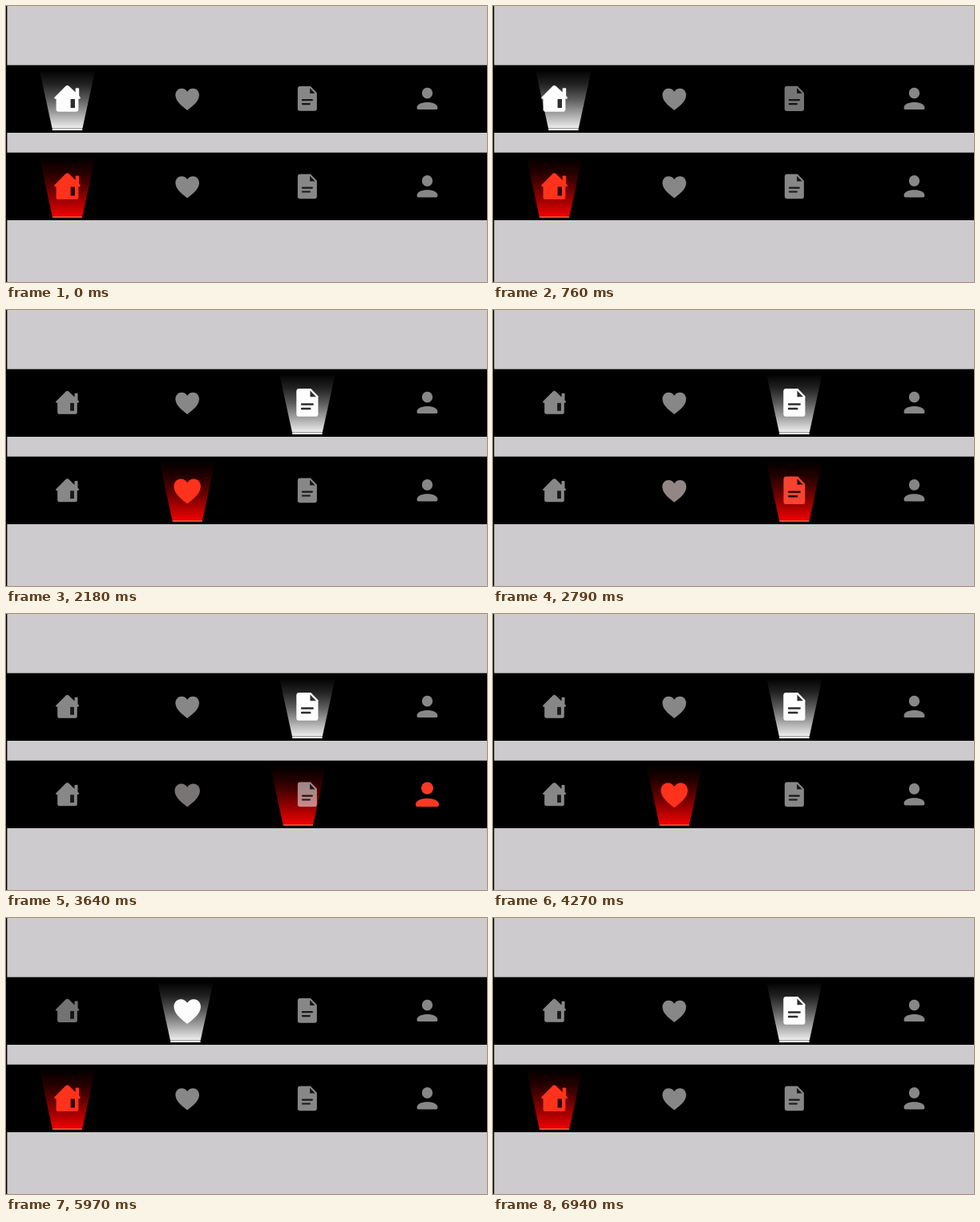
Write an HTML page with a canvas that moves like this. It is 600 by 344 pixels and loops after 7.06 s.

```html
<!DOCTYPE html>
<html lang="en">
<head>
<meta charset="utf-8">
<title>Spotlight navigation</title>
<style>
  html, body { margin: 0; width: 100%; height: 100%; overflow: hidden; background: #cecbce; }
  canvas { display: block; width: 600px; height: 344px; }
</style>
</head>
<body>
<canvas id="stage" width="600" height="344"></canvas>
<script>
const ctx = document.getElementById('stage').getContext('2d');
const LOOP = 7060;
const SLIDE = 380;       // light travel
const FADE_DELAY = 110;  // icons wait before changing
const FADE = 330;
const STEP = 149.67;
const tabX = i => 76.5 + i * STEP;

// moves: [hover time, click time, tab]
const bars = [
  { y: 74, iconY: 115.3, beam: [255, 255, 255], lit: [253, 253, 253], line: '#fff',
    moves: [[670, 740, 2], [5090, 5140, 1], [5850, 5960, 0], [6480, 6500, 2]] },
  { y: 183, iconY: 224.7, beam: [255, 0, 0], lit: [255, 50, 28], line: '#ff3a2c',
    moves: [[1590, 1740, 1], [2400, 2420, 2], [2780, 2800, 3], [3420, 3522, 1], [4460, 4480, 0]] }
];

const path = d => new Path2D(d);
const icons = [
  { // house
    body: path('M-14.3-1.2L-2-13.6Q0-15.4 2-13.6L9-6.8V-10.6Q9-11.6 10-11.6H12Q13-11.6 13-10.6V-3L14.5-1.2' +
               'Q15 .4 13.2.4H12.3V12Q12.3 14.5 9.8 14.5H-9.8Q-12.3 14.5-12.3 12V.4H-13.2Q-15 .4-14.3-1.2Z'),
    cut: path('M3.6.6H8.4V10.4H3.6Z')
  },
  { // heart
    body: path('M0 14.8C-4 11.4-14.8 4.6-14.8-4.2C-14.8-9.2-11.2-12.5-7.3-12.5C-4-12.5-1.5-11 0-8.4' +
               'C1.5-11 4-12.5 7.3-12.5C11.2-12.5 14.8-9.2 14.8-4.2C14.8 4.6 4 11.4 0 14.8Z')
  },
  { // document
    body: path('M-9-15.3H4L12-7V12.5Q12 15.5 9 15.5H-9Q-12 15.5-12 12.5V-12.3Q-12-15.3-9-15.3Z'),
    cut: path('M3.2-13V-6.2H9.8Z'),
    lines: path('M-6 1.9H6M-6 6.8H3')
  },
  { // person
    body: path('M0-13.6C3.8-13.6 6.6-10.6 6.6-6.8S3.8 0 0 0S-6.6-3-6.6-6.8S-3.8-13.6 0-13.6Z' +
               'M-13 11.6C-13 7.2-7 4.6 0 4.6S13 7.2 13 11.6Q13 13.8 10.8 13.8H-10.8Q-13 13.8-13 11.6Z')
  }
];

const clamp = v => Math.max(0, Math.min(1, v));
const mix = (a, b, p) => a + (b - a) * p;
const fadeOut = p => 1 - Math.pow(1 - clamp(p), 1.5);

// cubic-bezier(.25, .1, .25, 1)
function ease(p) {
  if (p <= 0) return 0;
  if (p >= 1) return 1;
  const curve = (u, a, b) => 3 * (1 - u) * (1 - u) * u * a + 3 * (1 - u) * u * u * b + u * u * u;
  let lo = 0, hi = 1;
  for (let i = 0; i < 20; i++) {
    const mid = (lo + hi) / 2;
    if (curve(mid, .25, .25) < p) lo = mid; else hi = mid;
  }
  return curve(lo, .1, 1);
}

function poseAt(bar, t) {
  let x = tabX(0);
  const lit = [1, 0, 0, 0], dim = [0, 0, 0, 0], grow = [0, 0, 0, 0];
  for (const [hover, click, tab] of bar.moves) {
    if (t < hover) break;
    x = mix(x, tabX(tab), ease((t - click) / SLIDE));
    const p = fadeOut((t - click - FADE_DELAY) / FADE);
    lit.forEach((v, i) => { lit[i] = mix(v, i === tab ? 1 : 0, p); });
    dim[tab] = clamp((t - hover) / 100) * (1 - p);
    grow[tab] = .5 * clamp((t - click) / FADE_DELAY) * (1 - p);
  }
  return { x, lit, dim, grow };
}

function drawBeam(bar, x) {
  const top = bar.y + 5, end = bar.y + 78;
  const tint = a => `rgba(${bar.beam},${a})`;
  const glow = ctx.createLinearGradient(0, top, 0, end);
  [[0, 0], [.25, .13], [.5, .35], [.75, .63], [1, .93]].forEach(([p, a]) => glow.addColorStop(p, tint(a)));
  ctx.fillStyle = glow;
  ctx.beginPath();
  ctx.moveTo(x - 35, top);
  ctx.lineTo(x + 35, top);
  ctx.lineTo(x + 19, end);
  ctx.lineTo(x - 19, end);
  ctx.fill();
  ctx.fillStyle = bar.line;
  ctx.fillRect(x - 18.7, end + .4, 37.4, 2.6);
}

function drawIcon(icon, x, y, color, scale) {
  ctx.save();
  ctx.translate(x, y);
  ctx.scale(scale, scale);
  ctx.fillStyle = color;
  ctx.fill(icon.body);
  ctx.fillStyle = ctx.strokeStyle = 'rgba(0,0,0,.82)';
  if (icon.cut) ctx.fill(icon.cut);
  if (icon.lines) {
    ctx.lineWidth = 2.2;
    ctx.lineCap = 'round';
    ctx.stroke(icon.lines);
  }
  ctx.restore();
}

function drawBar(bar, t) {
  const pose = poseAt(bar, t);
  ctx.fillStyle = '#000';
  ctx.fillRect(0, bar.y - .3, 600, 84.3);
  drawBeam(bar, pose.x);
  icons.forEach((icon, i) => {
    const lit = pose.lit[i];
    const rgb = bar.lit.map(c => Math.round(mix(255, c, lit)));
    const alpha = mix(.53 - .08 * pose.dim[i], 1, lit);
    const scale = 1 + .13 * Math.max(lit, pose.grow[i]);
    drawIcon(icon, tabX(i), bar.iconY, `rgba(${rgb},${alpha})`, scale);
  });
}

function draw(t) {
  ctx.fillStyle = '#cecbce';
  ctx.fillRect(0, 0, 600, 344);
  ctx.fillStyle = '#000';
  ctx.fillRect(0, 0, 1.4, 344);
  bars.forEach(bar => drawBar(bar, t));
}

const start = performance.now();
function tick() {
  draw((performance.now() - start) % LOOP);
  requestAnimationFrame(tick);
}
tick();
</script>
</body>
</html>
```
